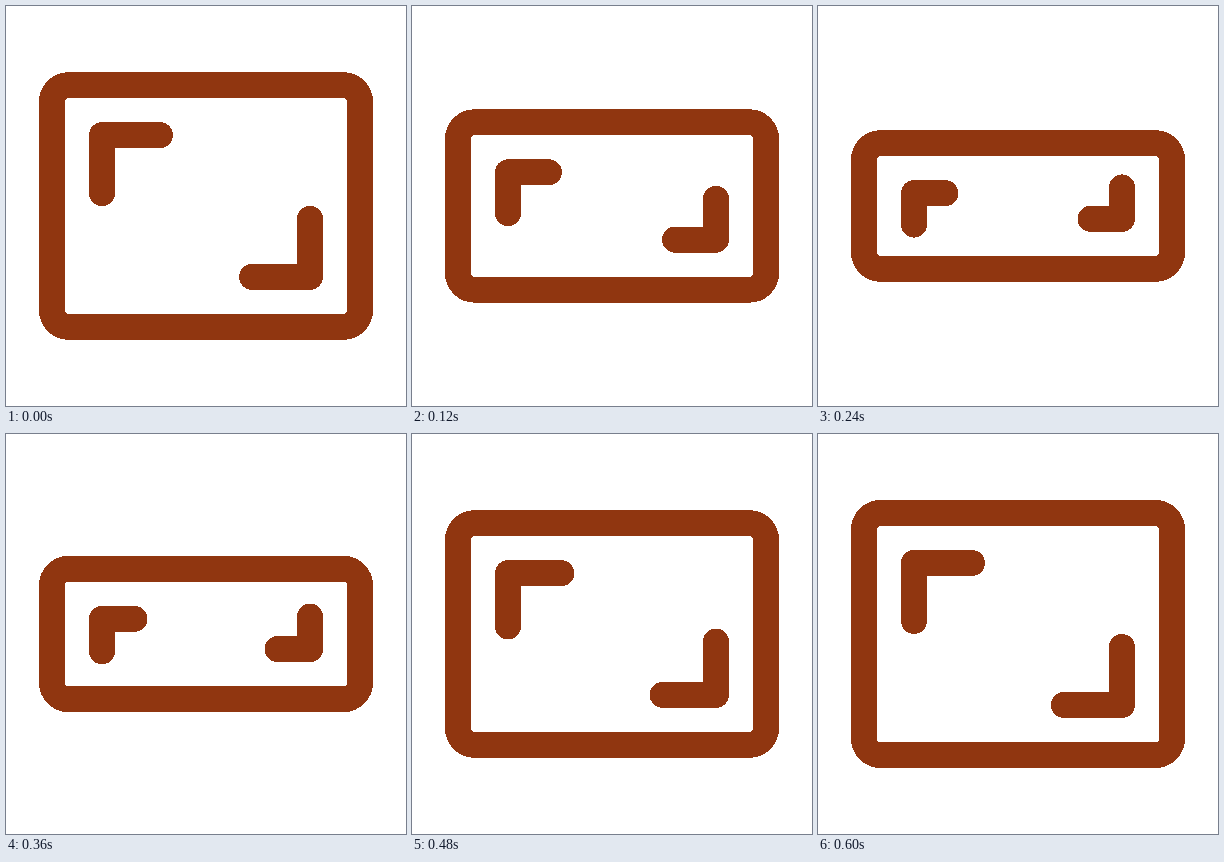
These frames come from a looping animation (400x400 px, 0.63 s). An HTML page without scripts:

```html
<!DOCTYPE html>
<html lang="en">
<head>
<meta charset="utf-8">
<title>Squeezing frame</title>
<style>
  html, body { margin: 0; width: 100%; height: 100%; overflow: hidden; background: #fff; }
  svg { display: block; width: 100%; height: 100%; }
  .lines {
    fill: none;
    stroke: #903610;
    stroke-width: 26;
    stroke-linecap: round;
    stroke-linejoin: round;
    shape-rendering: crispEdges;
  }
  .frame { x: 46px; width: 308px; rx: 16.5px; animation: squeeze 630ms infinite; }
  .corner { animation: shorten 630ms infinite; }

  /* Quick squeeze, sharp release, short rest */
  @keyframes squeeze {
    0% { y: 79px; height: 242px; animation-timing-function: cubic-bezier(.2, .13, .5, 1); }
    42.857% { y: 138px; height: 124px; animation-timing-function: cubic-bezier(.84, 0, .26, 1); }
    95.238%, 100% { y: 79px; height: 242px; }
  }
  @keyframes shorten {
    0% { d: path("M154 129H96V187"); animation-timing-function: cubic-bezier(.2, .13, .5, 1); }
    42.857% { d: path("M127 188H96V219"); animation-timing-function: cubic-bezier(.84, 0, .26, 1); }
    95.238%, 100% { d: path("M154 129H96V187"); }
  }
</style>
</head>
<body>
<svg viewBox="0 0 400 400">
  <g class="lines">
    <rect class="frame" x="46" y="79" width="308" height="242" rx="16.5"/>
    <path class="corner" d="M154 129H96V187"/>
    <g transform="rotate(180 200 200)">
      <path class="corner" d="M154 129H96V187"/>
    </g>
  </g>
</svg>
</body>
</html>
```
